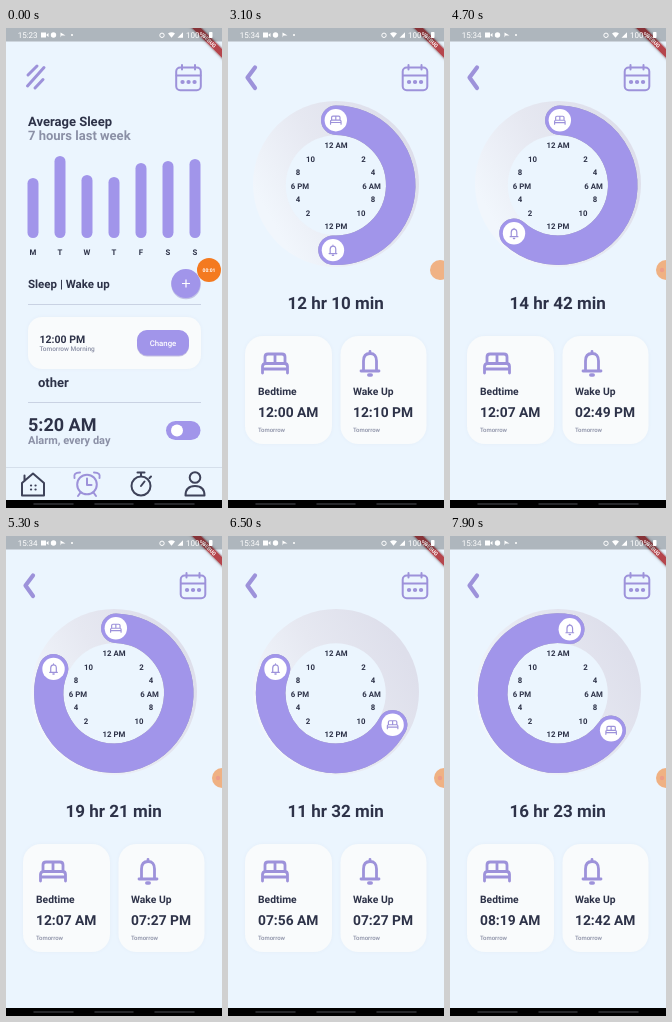
Write an HTML page that moves like this. It is 216 px wide and 480 px high and loops after 8000 ms.

```html
<!DOCTYPE html>
<html lang="en">
<head>
<meta charset="utf-8">
<title>Sleep alarm</title>
<style>
  html, body { margin: 0; width: 100%; height: 100%; overflow: hidden; background: #ebf5fe; }
  svg { display: block; width: 100vw; height: 100vh; }
  text { font-family: Roboto, Arial, sans-serif; font-weight: 700; fill: #2d3248; text-rendering: geometricPrecision; }
  .mid { text-anchor: middle; }
  .grey { fill: #8b90a6; }
  .tiny { fill: #8b90a6; font-size: 6px; font-weight: 500; }
  .small { font-size: 7.8px; }
  .white { fill: #fff; }
  .status { fill: #fff; font-size: 8px; font-weight: 400; }
  .accent { fill: #a195ea; }
  .card { fill: #f9fbfc; filter: drop-shadow(0 0 1.5px #e3edf8); }
  .rule { stroke: #c9d2e3; stroke-width: 1; }
  .line { fill: none; stroke: #9d92da; stroke-width: 2; stroke-linecap: round; stroke-linejoin: round; }
  .dark { stroke: #3e4259; }
  #arc { filter: drop-shadow(0 .5px .5px #77778899); }
  #banner rect { filter: drop-shadow(0 0 1.5px #0006); }
</style>
</head>
<body>
<svg viewBox="0 0 216 480" preserveAspectRatio="none">
  <defs>
    <linearGradient id="track" x1="0.1" y1="0.7" x2="0.9" y2="0.25">
      <stop offset="0" stop-color="#f1f6fc"/>
      <stop offset="0.5" stop-color="#e6e8f1"/>
      <stop offset="1" stop-color="#dedfeb"/>
    </linearGradient>
    <g id="calendar" class="line">
      <rect x="-12.3" y="-10.5" width="24.600" height="22.800" rx="4"/>
      <path d="M-12-2.500H12M-6.500-13v4.500M6.500-13v4.500"/>
      <path d="M-6 4h.1M0 4h.1M6 4h.1" stroke-width="4.200"/>
    </g>
    <g id="bed" class="line">
      <path d="M-10 0V-6.500q0-3 3-3H7q3 0 3 3V0M0-9V0M-12.500 9.500V3q0-3 3-3H9.500q3 0 3 3V9.500M-12.500 5.500H12.500" stroke-width="2.800"/>
    </g>
    <g id="bell" class="line">
      <path d="M-9 8H9M-6.500 7.500V-2q0-7.500 6.500-7.500T6.500-2V7.500M0-10V-11.500" stroke-width="2.800"/>
      <path d="M-1.200 12H1.200" stroke-width="3.500"/>
    </g>
  </defs>

  <rect width="216" height="480" fill="#ebf5fe"/>

  <g id="home">
    <path class="line" d="M22 47L31 38M21.500 58L38 39.500M29 60L37 51.500" style="stroke-width:3"/>
    <use href="#calendar" x="182.500" y="50"/>
    <text x="22" y="98" font-size="13">Average Sleep</text>
    <text x="22" y="112" font-size="13" class="grey">7 hours last week</text>
    <g id="week"></g>
    <text x="22" y="260" font-size="11.500">Sleep | Wake up</text>
    <circle cx="180" cy="256.500" r="14.800" fill="#8f86c8" opacity=".45"/>
    <circle class="accent" cx="179.800" cy="255.500" r="14.500"/>
    <path d="M176 255.500h8M180 251.500v8" stroke="#fff" stroke-width="1.200"/>
    <path class="rule" d="M22 276.500H195M22 374.500H195"/>
    <rect class="card" x="22" y="289" width="173" height="52" rx="14"/>
    <text x="33.500" y="315" font-size="10.500">12:00 PM</text>
    <text x="33.500" y="323" class="tiny" style="font-size:6.500px">Tomorrow Morning</text>
    <rect x="131" y="302.500" width="52" height="26" rx="10" fill="#8f86c8" opacity=".5"/>
    <rect class="accent" x="131" y="302" width="52" height="25.500" rx="10"/>
    <text x="157" y="317.500" class="mid white" font-size="7.800" style="font-weight:500">Change</text>
    <text x="32" y="359" font-size="13">other</text>
    <text x="22" y="403" font-size="18">5:20 AM</text>
    <text x="22" y="416" font-size="11" class="grey">Alarm, every day</text>
    <rect class="accent" x="160" y="393" width="34.500" height="19" rx="9.500"/>
    <circle class="white" cx="171" cy="402.500" r="6"/>

    <path d="M0 439.500H216" stroke="#d5dfeb"/>
    <path class="line dark" d="M16 467V455L27 445.500L38 455V467.500H16ZM18.500 453V447.500"/>
    <path class="line dark" d="M25 457.500h.1M29.500 457.500h.1M25 461.500h.1M29.500 461.500h.1" style="stroke-width:2.200"/>
    <g class="line">
      <circle cx="81" cy="456.500" r="9.800"/>
      <path d="M81 450.500V457H85.500M74.500 464.500L72 468M87.500 464.500L90 468M68.500 450Q67 444.500 74 444.500M93.500 450Q95 444.500 88 444.500"/>
    </g>
    <g class="line dark">
      <circle cx="135" cy="458" r="9.500"/>
      <path d="M131.500 444.500H138.500M135 445V448M135 458L138.500 453.500M143.500 450L145 448.500"/>
      <circle cx="189" cy="449.500" r="5.300"/>
      <path d="M179.500 467.500Q179.500 458 189 458T198.500 467.500Z"/>
    </g>
  </g>

  <g id="timer">
    <path class="line" d="M27 39.500L19.500 49.500L27 60" style="stroke-width:4.200"/>
    <use href="#calendar" x="187" y="50"/>
    <circle cx="108" cy="156" r="83" fill="url(#track)"/>
    <circle cx="107.800" cy="157.200" r="50" fill="#ebf5fe"/>
    <path id="arc" fill="none" stroke="#a195ea" stroke-width="29.500" stroke-linecap="round"/>
    <g id="bedKnob"><circle class="white" r="11.200"/><use href="#bed" transform="scale(.42)"/></g>
    <g id="wakeKnob"><circle class="white" r="11.200"/><use href="#bell" transform="scale(.43)"/></g>
    <g id="hours"></g>
    <text id="span" class="mid" x="107.600"></text>
    <g id="cards">
      <rect class="card" x="17" y="308" width="87" height="108" rx="18"/>
      <rect class="card" x="112.500" y="308" width="86" height="108" rx="18"/>
      <use href="#bed" x="47" y="335.500"/>
      <use href="#bell" x="142" y="335"/>
      <text x="30" y="367" font-size="10.300">Bedtime</text>
      <text x="125" y="367" font-size="10.300">Wake Up</text>
      <text x="30" y="389" font-size="13.800" id="bedTime"></text>
      <text x="125" y="388.500" font-size="13.800" id="wakeTime"></text>
      <text x="30" y="403.500" class="tiny">Tomorrow</text>
      <text x="125" y="403.500" class="tiny">Tomorrow</text>
    </g>
  </g>

  <g id="bubble">
    <circle id="disc" fill="#f47a20"/>
    <text id="count" class="mid white" y="2" font-size="5"></text>
    <circle id="dot" cx="-4" r="2.200" fill="#f0562a"/>
  </g>

  <g id="banner" transform="translate(216 0) rotate(45)">
    <rect x="-30" y="14.700" width="60" height="6.500" fill="#b5454c"/>
    <text class="mid white" y="19.900" font-size="5.300">DEBUG</text>
  </g>

  <rect width="216" height="13.500" opacity=".26"/>
  <g fill="#fff">
    <text id="clock" class="status" x="11.700" y="9.800"></text>
    <path d="M35 4.500h5v5h-5zM40.500 6.500l2-1.500v4l-2-1.500z"/>
    <circle cx="47.500" cy="7" r="2.700"/>
    <path d="M54.500 9.500V4.500L59.500 7.500H55.500"/>
    <circle cx="66" cy="7" r="1"/>
    <circle cx="156" cy="7.300" r="2.200" fill="none" stroke="#fff"/>
    <path d="M162 5.500Q165.500 3 169 5.500L165.500 9.800ZM171.500 9.800L177 4.200V9.800Z"/>
    <text class="status" x="180" y="9.800">100%</text>
    <rect x="203" y="4" width="3.500" height="6" rx=".7"/>
  </g>
  <rect y="472" width="216" height="8"/>
  <path d="M28 476H67M89 476H127M149 476H188" stroke="#34363a" stroke-width="1.500" stroke-linecap="round"/>
</svg>

<script>
const LOOP = 8000, STEP = 100;
const $ = id => document.getElementById(id);

// [time in ms, minutes after midnight]
const bedKeys = [[4400, 0], [4500, 7.2], [5800, 7.2], [5900, 45], [6500, 476.2],
  [6700, 495.5], [6800, 495.5], [6900, 499.5]];
const wakeKeys = [[3200, 730], [3400, 740], [4100, 740], [4200, 750], [4400, 750],
  [5300, 1167.9], [7400, 1167.9], [7500, 1227.9], [7900, 1482.5]];
// [time in ms, x]
const bubbleKeys = [[1200, 203], [1500, 212], [4400, 212], [4500, 216]];

function valueAt(keys, t) {
  if (t <= keys[0][0]) return keys[0][1];
  for (let i = 1; i < keys.length; i++) {
    const [t0, a] = keys[i - 1], [t1, b] = keys[i];
    if (t <= t1) return a + (b - a) * (t - t0) / (t1 - t0);
  }
  return keys[keys.length - 1][1];
}

const pad = n => String(n).padStart(2, '0');

function clockText(minutes) {
  const m = Math.floor(minutes) % 1440, h = Math.floor(m / 60);
  return `${pad(h % 12 || 12)}:${pad(m % 60)} ${h < 12 ? 'AM' : 'PM'}`;
}

function dialPoint(minutes) {
  const a = minutes / 1440 * 2 * Math.PI;
  return [107.8 + 65 * Math.sin(a), 157.2 - 65 * Math.cos(a)].map(v => v.toFixed(2));
}

function drawTimer(t) {
  const bed = valueAt(bedKeys, t), wake = valueAt(wakeKeys, t);
  const from = dialPoint(bed), to = dialPoint(wake);
  const span = Math.round(wake - bed), minutes = span % 60;
  const short = minutes < 10;
  $('arc').setAttribute('d', `M${from}A65 65 0 ${+(wake - bed > 720)} 1 ${to}`);
  $('bedKnob').setAttribute('transform', `translate(${from})`);
  $('wakeKnob').setAttribute('transform', `translate(${to})`);
  $('span').textContent = `${Math.floor(span / 60)} hr ${minutes} min`;
  $('span').setAttribute('font-size', short ? 18.8 : 17);
  $('span').setAttribute('y', short ? 282.5 : 281);
  $('cards').setAttribute('transform', `translate(0 ${short ? 2 : 0})`);
  $('bedTime').textContent = clockText(bed);
  $('wakeTime').textContent = clockText(wake);
}

function drawBubble(t) {
  const counting = t < 1300;
  $('bubble').setAttribute('transform', `translate(${valueAt(bubbleKeys, t)} 242)`);
  $('bubble').setAttribute('opacity', t < 1700 ? 1 : t < 1800 ? 0.8 : 0.55);
  $('disc').setAttribute('r', counting ? 12 : 10);
  $('count').textContent = counting ? (t < 1000 ? '00:01' : '00:02') : '';
  $('dot').style.display = t < 4500 ? 'none' : '';
}

function draw(now) {
  const t = Math.floor(now % LOOP / STEP) * STEP;
  const onTimer = t >= 3100;
  $('home').style.display = onTimer ? 'none' : '';
  $('timer').style.display = onTimer ? '' : 'none';
  $('clock').textContent = t < 100 ? '15:23' : '15:34';
  drawTimer(t);
  drawBubble(t);
  requestAnimationFrame(draw);
}

const label = (s, x, y) => `<text class="mid small" x="${x}" y="${y}">${s}</text>`;

$('week').innerHTML = [150, 128, 147, 149, 135, 133, 131].map((top, i) => {
  const x = 27 + 27 * i;
  return `<rect class="accent" x="${x - 5.5}" y="${top}" width="11" height="${210 - top}" rx="5.500"/>`
    + label('MTWTFSS'[i], x, 227);
}).join('');

$('hours').innerHTML = [
  ['12 AM', 108, 0], ['2', 135.5, 1], ['4', 145, 2], ['6 AM', 143.5, 3],
  ['8', 145, 4], ['10', 133, 5], ['12 PM', 108, 6], ['2', 80, 5],
  ['4', 70, 4], ['6 PM', 72, 3], ['8', 70, 2], ['10', 82.5, 1]
].map(([s, x, row]) => label(s, x, 120 + 13.5 * row)).join('');

requestAnimationFrame(draw);
</script>
</body>
</html>
```
